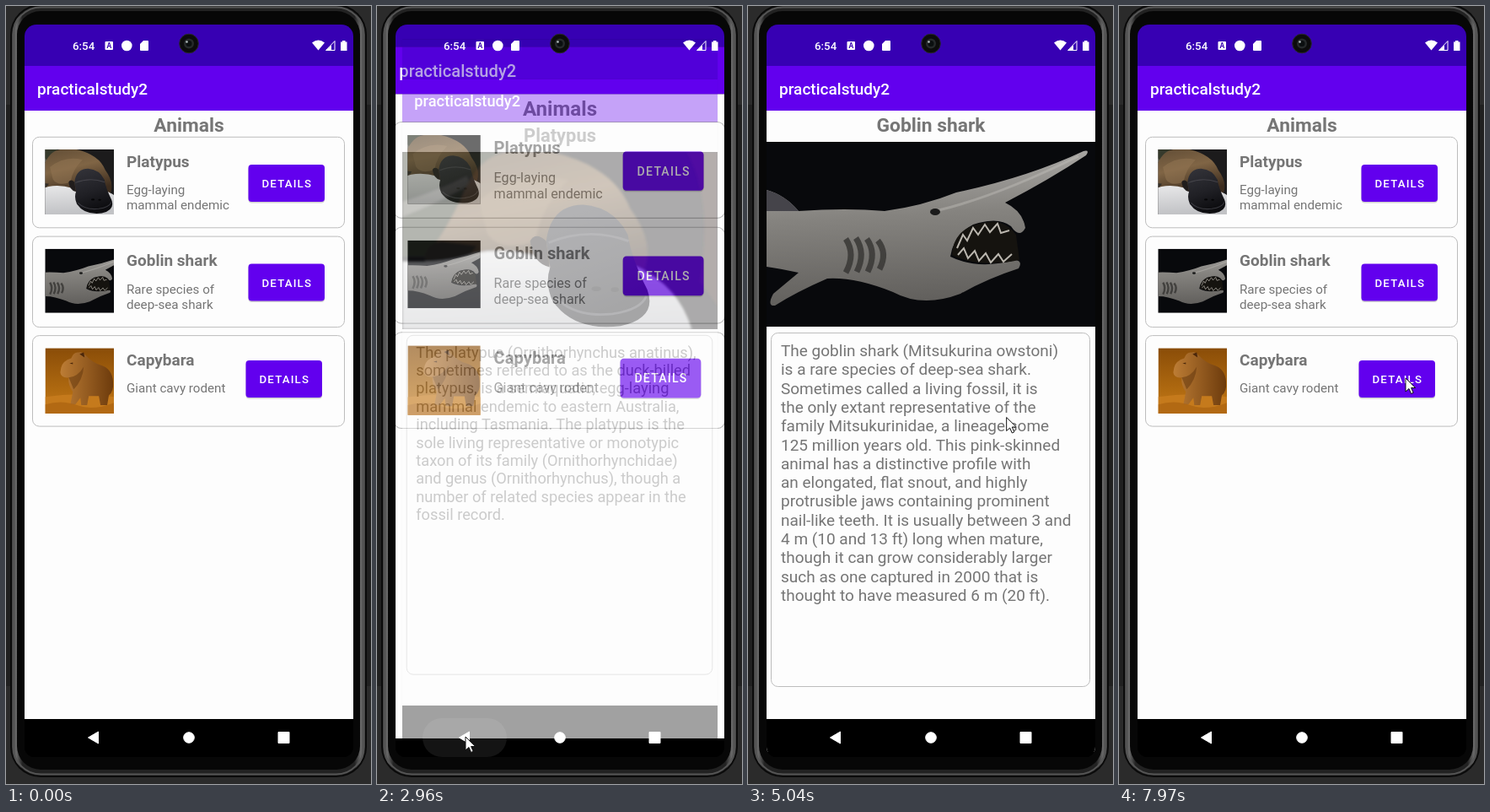
Write an HTML page that moves like this. It is 433 px wide and 922 px high and loops after 8000 ms.

```html
<!DOCTYPE html>
<html lang="en">
<head>
<meta charset="utf-8">
<title>Animals</title>
<style>
html, body { margin: 0; width: 100%; height: 100%; overflow: hidden; background: #2b2b2b; }
svg { display: block; }
#stage { width: 100vw; height: 100vh; }
text { font-family: Roboto, sans-serif; fill: #757575; white-space: pre; }
.bar { font-size: 19px; font-weight: 500; fill: #fff; }
.head { font-size: 22.8px; font-weight: 700; text-anchor: middle; }
.name { font-size: 19px; font-weight: 700; }
.note { font-size: 15.2px; }
.body { font-size: 19px; }
.label { font-size: 13.27px; font-weight: 500; letter-spacing: 1.185px; fill: #fff; }
.box { fill: none; stroke: #bdbdbd; }
</style>
</head>
<body>
<svg id="stage" viewBox="0 0 433 922">
  <defs>
    <clipPath id="screen"><path d="M22 36a14 14 0 0 1 14-14H398a14 14 0 0 1 14 14V878a12 12 0 0 1-12 12H34a12 12 0 0 1-12-12Z"/></clipPath>
    <linearGradient id="rim"><stop stop-color="#333"/><stop offset=".012" stop-color="#6a6a6a"/><stop offset=".03" stop-color="#222"/><stop offset=".97" stop-color="#222"/><stop offset=".988" stop-color="#6a6a6a"/><stop offset="1" stop-color="#333"/></linearGradient>
    <linearGradient id="fur" x2=".4" y2="1"><stop stop-color="#5d4a34"/><stop offset=".5" stop-color="#806545"/><stop offset="1" stop-color="#3c2c1e"/></linearGradient>
    <linearGradient id="bill" x2=".3" y2="1"><stop stop-color="#34343a"/><stop offset=".6" stop-color="#202025"/><stop offset="1" stop-color="#0d0d10"/></linearGradient>
    <linearGradient id="towel" x2=".2" y2="1"><stop stop-color="#e9e9ea"/><stop offset="1" stop-color="#c2c3c6"/></linearGradient>
    <linearGradient id="skin" x2=".1" y2="1"><stop stop-color="#b0aeab"/><stop offset=".45" stop-color="#85837f"/><stop offset="1" stop-color="#62605d"/></linearGradient>
    <linearGradient id="dusk" x2="0" y2="1"><stop stop-color="#8a4d08"/><stop offset=".65" stop-color="#b06a10"/><stop offset="1" stop-color="#c67b1c"/></linearGradient>
    <linearGradient id="coat"><stop stop-color="#bd7d35"/><stop offset="1" stop-color="#6d3b0c"/></linearGradient>
    <filter id="soft"><feGaussianBlur stdDeviation="1.6"/></filter>

    <symbol id="pic0" viewBox="0 0 390 219" preserveAspectRatio="xMidYMid slice">
      <path d="M0 0H390V219H0Z" fill="#1c1b1c"/>
      <g filter="url(#soft)">
        <path d="M0 0H120L60 130H0Z" fill="#363a2c"/>
        <path d="M0 62Q45 48 80 30L84 40Q45 62 0 80Z" fill="#68675c"/>
        <path d="M352 0Q385 60 368 160L390 190V0Z" fill="#33221a"/>
        <path d="M28 130Q50 105 72 60Q92 5 130 0H185Q262 18 282 70Q312 110 300 145L180 160Q110 125 40 137Z" fill="url(#fur)"/>
        <path d="M95 60Q145 20 205 35Q170 70 165 110Q120 125 105 100Z" fill="#927552" opacity=".55"/>
        <path d="M28 135Q28 115 48 110L92 116Q80 138 40 137Z" fill="#332d27"/>
        <path d="M0 135Q55 138 90 125Q130 118 170 130L200 160L290 142Q342 165 358 219H0Z" fill="url(#towel)"/>
      </g>
      <path d="M158 110Q165 98 178 110L182 142Q162 138 158 110Z" fill="#211d1c"/>
      <path d="M178 110Q184 65 224 65Q262 68 279 102Q283 130 303 170Q316 205 270 215Q212 222 186 184Q176 163 183 142Z" fill="url(#bill)"/>
      <path d="M181 112Q230 92 280 110" fill="none" stroke="#56545a" stroke-width="3" opacity=".6"/>
      <path d="M190 180Q215 205 260 200Q295 195 302 178" fill="none" stroke="#4b4b52" stroke-width="3" opacity=".7"/>
      <g fill="#050506"><ellipse cx="240" cy="169" rx="6" ry="3"/><ellipse cx="263" cy="170" rx="5" ry="3"/></g>
    </symbol>

    <symbol id="pic1" viewBox="0 0 390 219" preserveAspectRatio="xMidYMid slice">
      <path d="M0 0H390V219H0Z" fill="#08090c"/>
      <path d="M0 57Q22 63 38 82Q95 78 140 82Q185 76 225 60Q310 42 376 11Q384 9 379 16Q335 45 283 72Q304 82 307 102Q300 115 290 100Q275 88 245 98Q222 110 218 136Q250 152 296 140Q304 142 299 150Q262 162 230 180Q185 197 150 178Q105 160 72 162Q35 178 10 194Q0 195 8 180L38 155Q15 150 0 148Z" fill="url(#skin)"/>
      <path d="M0 57Q22 63 38 82H0Z" fill="#45444a"/>
      <path d="M220 134Q222 104 252 97Q280 88 296 110L300 140Q250 150 220 134Z" fill="#15130f"/>
      <path d="M226 126l7-16 5 7 7-15 6 8 8-12 6 9 9-10 4 11 10-3M227 134l7-8 5 12 8-9 5 12 8-9 6 11 9-10 6 9 10-9" fill="none" stroke="#bab6ae" stroke-width="2"/>
      <path d="M94 115q12 18 0 40M106 114q12 18 1 40M119 115q12 17 1 39M132 117q12 15 2 34" fill="none" stroke="#393836" stroke-width="7" opacity=".85"/>
      <path d="M200 82Q270 66 370 17" fill="none" stroke="#c6c4bf" stroke-width="3" opacity=".4"/>
      <ellipse cx="200" cy="83" rx="6" ry="4" fill="#1b1b1b"/>
    </symbol>

    <symbol id="pic2" viewBox="0 0 82 78">
      <path d="M0 0H82V78H0Z" fill="url(#dusk)"/>
      <path d="M0 58Q40 52 82 58V78H0Z" fill="#c57a1c"/>
      <path d="M19 23Q21 15 31 12Q34 4 40 5Q44 3 48 8Q56 17 66 20Q80 24 81 40Q82 52 76 56L74 68H66L64 57H52L50 68H43L42 59L36 67H30L33 52Q27 44 28 35Q19 36 18 29Z" fill="url(#coat)"/>
      <path d="M28 35Q39 34 46 22Q45 38 34 49Z" fill="#60350d" opacity=".5"/>
      <path d="M41 7l5-2 1 6ZM29 18l4-1v2Z" fill="#4b270a"/>
      <path d="M0 67Q20 61 38 68T82 65V78H0Z" fill="#ab6310" opacity=".7"/>
    </symbol>
  </defs>

  <!-- phone body -->
  <path d="M0 0H433V922H0Z" fill="#2b2b2b"/>
  <path d="M0 117H6V806H0ZM427 117H433V806H427Z" fill="#202020"/>
  <rect x="5" y="-2" width="423" height="916" rx="36" fill="#0a0a0a"/>
  <rect x="7" y="0" width="419" height="912" rx="34" fill="url(#rim)"/>
  <rect x="8.5" y="1.5" width="416" height="909" rx="33" fill="none" stroke="#555" stroke-width="2"/>
  <rect x="13" y="6" width="407" height="899" rx="28" fill="#070707"/>

  <g clip-path="url(#screen)">
    <path d="M22 22H412V890H22Z"/>
    <g id="home"></g>
    <g id="detail0"></g>
    <g id="detail1"></g>
    <rect id="pill" x="54" y="844" width="100" height="46" rx="23" fill="#fff"/>
    <g id="nav" fill="#fff" stroke="#fff" stroke-linejoin="round">
      <path d="M97.500 867L109.500 860V874Z"/><circle cx="217" cy="867" r="6.300"/><rect x="323" y="860.500" width="13" height="13"/>
    </g>
    <text x="79" y="51.500" style="font-size:13.300px;font-weight:500;fill:#fff">6:54</text>
    <g fill="#fff">
      <rect x="117.500" y="42" width="9.500" height="10" rx="1"/>
      <circle cx="143.300" cy="47" r="6.300"/>
      <path d="M163 41H168a1 1 0 0 1 1 1V52a1 1 0 0 1-1 1H160a1 1 0 0 1-1-1V45Z"/>
      <path d="M363 43.500Q370.500 37.500 378 43.500L370.500 52.500Z"/>
      <path d="M397 42.500H399V41H402.500V42.500H404.500V53H397Z"/>
      <path d="M386 46.500V52.500H380Z"/>
      <path d="M379.500 52.500L390 41.500V52.500Z" fill="none" stroke="#fff"/>
    </g>
    <text x="122.300" y="50.200" style="font-size:8.500px;font-weight:700;fill:#3700b3;text-anchor:middle">A</text>
  </g>
  <circle cx="217" cy="44.500" r="11.300" fill="#0c0c0c" stroke="#29292b"/>
  <circle cx="217" cy="44.500" r="6" fill="#262a2b"/>
  <circle cx="217" cy="44.500" r="3.500" fill="#0b0f10"/>
  <circle cx="214.500" cy="42.500" r="1.300" fill="#b8c4c4"/>
  <path id="cursor" d="M0 0V16L4 12.500L6.600 18.500L9.200 17.300L6.600 11.500H11.700Z" fill="#fff" stroke="#111"/>
</svg>
<script>
const $ = id => document.getElementById(id);
const clamp = v => Math.max(0, Math.min(1, v));
const text = (cls, x, y, s) => `<text class="${cls}" x="${x}" y="${y}">${s}</text>`;

const animals = [
  { name: 'Platypus', note: ['Egg-laying', 'mammal endemic'], y: 155, bx: 287.5, by: 188, ph: 77,
    about: `The platypus (Ornithorhynchus anatinus),
sometimes referred to as the duck-billed
platypus, is a semiaquatic, egg-laying
mammal endemic to eastern Australia,
including Tasmania. The platypus is the
sole living representative or monotypic
taxon of its family (Ornithorhynchidae)
and genus (Ornithorhynchus), though a
number of related species appear in the
fossil record.` },
  { name: 'Goblin shark', note: ['Rare species of', 'deep-sea shark'], y: 272.8, bx: 287.5, by: 305.5, ph: 76,
    about: `The goblin shark (Mitsukurina owstoni)
is a rare species of deep-sea shark.
Sometimes called a living fossil, it is
the only extant representative of the
family Mitsukurinidae, a lineage some
125 million years old. This pink-skinned
animal has a distinctive profile with
an elongated, flat snout, and highly
protrusible jaws containing prominent
nail-like teeth. It is usually between 3 and
4 m (10 and 13 ft) long when mature,
though it can grow considerably larger
such as one captured in 2000 that is
thought to have measured 6 m (20 ft).` },
  { name: 'Capybara', note: ['Giant cavy rodent'], y: 390.3, bx: 284.5, by: 420, ph: 78 }
];

const page = (title, content) => `
  <path d="M22 22H412V890H22Z"/>
  <path d="M22 22H412V71H22Z" fill="#3700b3"/>
  <path d="M22 124H412V845H22Z" fill="#fdfdfd"/>
  <path d="M22 71H412V124H22Z" fill="#6200ee"/>
  ${text('bar', 37, 105, 'practicalstudy2')}${text('head', 217, 148.5, title)}${content}`;

const card = (a, i) => `
  <rect class="box" x="31.5" y="${a.y + .3}" width="370" height="107.500" rx="8"/>
  <use href="#pic${i}" x="46.5" y="${a.y + 15}" width="81.500" height="${a.ph}"/>
  ${text('name', 143, a.y + 35.5, a.name)}
  ${a.note.map((s, k) => text('note', 143, a.y + 68 + k * 17.8, s)).join('')}
  <rect x="${a.bx}" y="${a.by + 1.5}" width="90.500" height="44" rx="4" opacity=".18"/>
  <rect x="${a.bx}" y="${a.by}" width="90.500" height="44" rx="4" fill="#6200ee"/>
  <rect id="press${i}" x="${a.bx}" y="${a.by}" width="90.500" height="44" rx="4" fill="#fff" opacity="0"/>
  ${text('label', a.bx + 16, a.by + 27, 'DETAILS')}`;

const detail = (a, i) => `
  <use href="#pic${i}" x="22" y="161" width="390" height="219"/>
  <rect class="box" x="27.500" y="387.500" width="378" height="419" rx="8"/>
  ${a.about.split('\n').map((s, k) => text('body', 39, 415 + k * 22.3, s)).join('')}`;

$('home').innerHTML = page('Animals', animals.map(card).join(''));
for (const i of [0, 1]) $('detail' + i).innerHTML = page(animals[i].name, detail(animals[i], i));

const bases = [0, 880, 1720, 2610, 3460, 4200, 5040, 5880, 6090, 6430, 6930, 7760];
function step(t) {
  const b = bases.findLast(v => v <= t);
  return b + Math.floor((t - b) / 70) * 70;
}

const cubic = (u, a, b, c, d) =>
  (1 - u) ** 3 * a + 3 * (1 - u) ** 2 * u * b + 3 * (1 - u) * u * u * c + u ** 3 * d;

// Fast start, very slow end: two joined Bezier curves.
function ease(x) {
  x = clamp(x);
  const [xs, ys] = x < 1 / 6
    ? [[0, .05, .1333, 1 / 6], [0, 0, .06, .4]]
    : [[1 / 6, .2083, .25, 1], [.4, .82, 1, 1]];
  let lo = 0, hi = 1;
  for (let i = 0; i < 20; i++) {
    const mid = (lo + hi) / 2;
    if (cubic(mid, ...xs) < x) lo = mid; else hi = mid;
  }
  return cubic(lo, ...ys);
}

// time, value(s): linear between the points
function track(points, t) {
  const k = points.findIndex(p => p[0] > t);
  if (k < 0) return points.at(-1).slice(1);
  if (k === 0) return points[0].slice(1);
  const [a, b] = [points[k - 1], points[k]], f = (t - a[0]) / (b[0] - a[0]);
  return a.slice(1).map((v, i) => v + (b[i + 1] - v) * f);
}

const path = [
  [0, 445, 890], [70, 424, 883], [270, 275, 770], [420, 212, 620], [600, 285, 422], [810, 336, 226],
  [1370, 338, 226], [1440, 341, 247], [1650, 310, 440], [2000, 167, 798], [2400, 105, 866],
  [2990, 105, 866], [3130, 124, 850], [3390, 273, 527], [3600, 291, 427], [3880, 330, 327],
  [3950, 331, 326], [4620, 331, 326], [4970, 323, 457], [5390, 225, 640], [5600, 135, 755],
  [5810, 117, 870], [5950, 106, 876], [6500, 106, 876], [6860, 130, 826], [7000, 135, 755],
  [7350, 250, 580], [7690, 335, 449], [7830, 340, 441]
];
const moves = [[1579, 0, true], [2893, 0, false], [4515, 1, true], [6400, 1, false]];
const zoom = s => `translate(217 456) scale(${s}) translate(-217 -456)`;
const fade = (id, points, t) => $(id).setAttribute('opacity', track(points, t)[0]);

function draw(t) {
  const [at, which, open] = moves.findLast(m => m[0] <= t) || moves[0];
  const age = t - at, p = ease(age / 400);
  const alpha = open ? clamp((age - 50) / 50) : 1 - clamp((age - 35) / 50);
  $('home').setAttribute('transform', zoom(open ? 1 + .1 * p : 1.1 - .1 * p));
  for (const i of [0, 1]) {
    const el = $('detail' + i);
    el.setAttribute('opacity', i === which ? alpha : 0);
    el.setAttribute('transform', zoom(open ? .85 + .15 * p : 1 - .1 * p));
  }
  fade('press0', [[1290, 0], [1370, .19], [1510, .19], [1650, 0]], t);
  fade('press1', [[4130, 0], [4270, .19], [4480, .19], [4550, .13], [4690, 0]], t);
  fade('pill', [[2600, 0], [2750, .11], [2890, .11], [2960, .08], [3130, 0], [6080, 0], [6230, .11], [6430, .11], [6640, 0]], t);
  fade('nav', [[1250, 1], [1720, .63], [2610, .63], [2750, 1]], t);
  $('cursor').setAttribute('transform', `translate(${track(path, t)})`);
}

function frame() {
  draw(step(performance.now() % 8000));
  requestAnimationFrame(frame);
}
frame();
</script>
</body>
</html>
```
